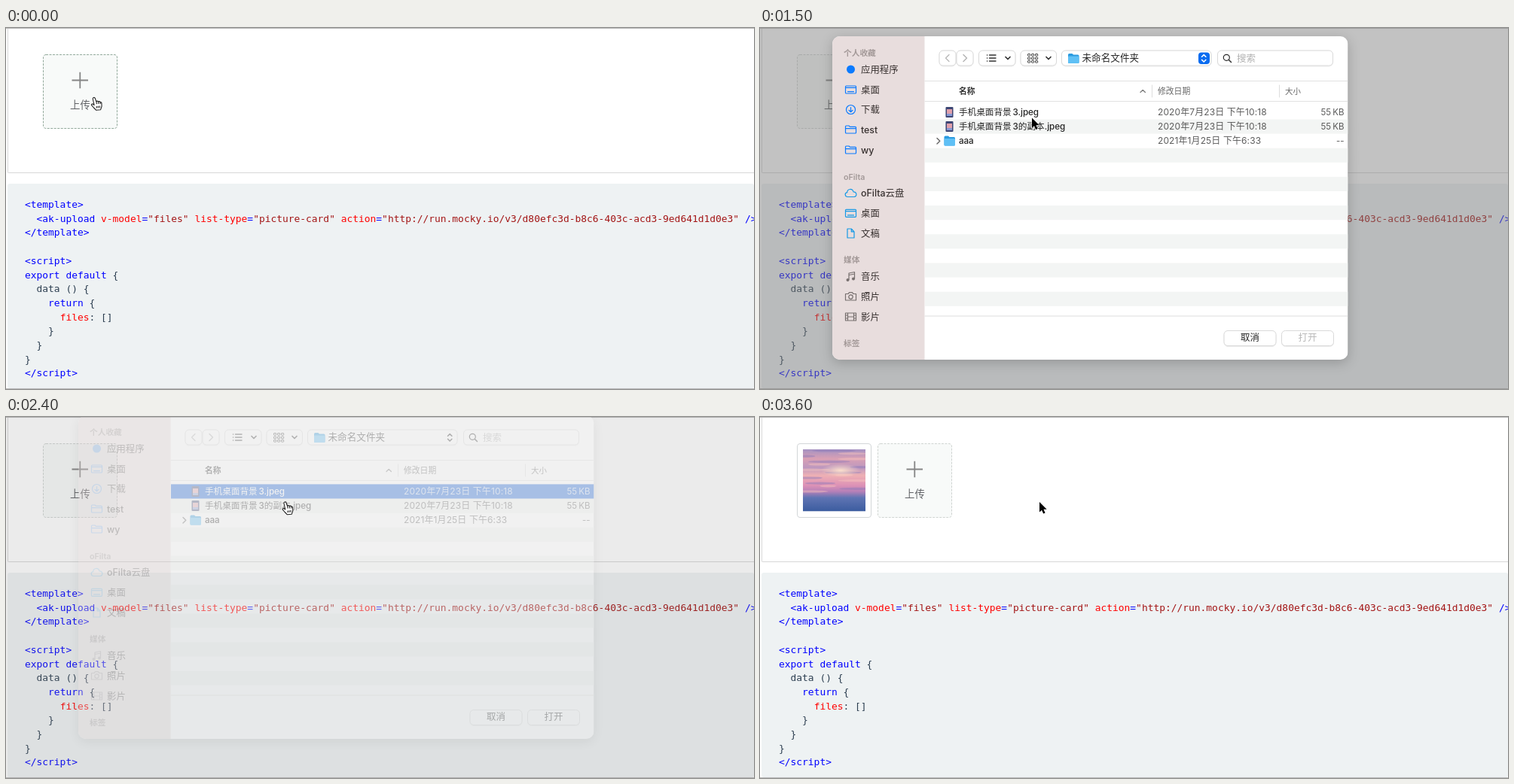
These frames come from a looping animation (993 by 480 pixels, 3.7 s). An HTML page:

```html
<!DOCTYPE html>
<html lang="zh">
<head>
<meta charset="utf-8">
<title>Upload demo</title>
<style>
html, body { margin: 0; width: 100%; height: 100%; overflow: hidden; background: #fff; }
.demo { position: absolute; left: 2px; top: 0; width: 991px; height: 193px; box-sizing: border-box; border: solid #d8d8d8; border-width: 0 0 1px 1px; border-radius: 0 0 0 2px; }
pre { position: absolute; left: 2px; top: 207px; width: 991px; height: 272px; margin: 0; padding: 19px 0 0 23px; box-sizing: border-box; overflow: hidden; background: #eef2f3; border-radius: 3px; color: #2c3e50; font: 12.91px/18.7px "DejaVu Sans Mono", monospace; }
pre b { color: #00f; font-weight: 400; }
pre i { color: #f00; font-style: normal; }
pre u { color: #a31515; text-decoration: none; }
svg { position: absolute; left: 0; top: 0; overflow: hidden; color: #262626; font-family: Inter, "Noto Sans CJK SC", "Noto Sans CJK", sans-serif; }
#sheet { filter: drop-shadow(0 4px 8px #0003); }
.line { fill: none; stroke: currentColor; stroke-width: 1.2; stroke-linecap: round; stroke-linejoin: round; }
</style>
</head>
<body>
<div class="demo"></div>
<pre><b>&lt;template&gt;</b>
  <b>&lt;ak-upload</b> <i>v-model</i><b>=</b><u>"files"</u> <i>list-type</i><b>=</b><u>"picture-card"</u> <i>action</i><b>=</b><u>"http://run.mocky.io/v3/d80efc3d-b8c6-403c-acd3-9ed641d1d0e3"</u> <b>/&gt;</b>
<b>&lt;/template&gt;</b>

<b>&lt;script&gt;</b>
<b>export</b> <b>default</b> {
  data () {
    <b>return</b> {
      <i>files</i>: []
    }
  }
}
<b>&lt;/script&gt;</b></pre>
<svg id="stage" width="993" height="480" viewBox="0 0 993 480"></svg>
<script>
const $ = id => document.getElementById(id);
const text = (x, y, s, size = 12, fill = '#262626', more = '') =>
  `<text x="${x}" y="${y}" font-size="${size}" fill="${fill}" ${more}>${s}</text>`;
const rect = (x, y, w, h, fill, r = 0, more = '') =>
  `<rect x="${x}" y="${y}" width="${w}" height="${h}" rx="${r}" fill="${fill}" ${more}/>`;
const path = (d, color, more = '') => `<path class="line" d="${d}" style="color:${color};${more}"/>`;
const medium = 'font-weight="500"', bold = 'font-weight="600"';

// Sidebar icons, drawn around 0,0
const icons = {
  dot: '<circle r="5.5" fill="currentColor"/>',
  desk: '<path class="line" d="M-6-5H6Q7-5 7-4V4Q7 5 6 5H-6Q-7 5-7 4V-4Q-7-5-6-5ZM-7-2.6H7M-4 2.6H4"/>',
  down: '<circle class="line" r="6"/><path class="line" d="M0-3V3M-2.5.8L0 3.2 2.5.8"/>',
  folder: '<path class="line" d="M-7-4Q-7-5-6-5H-2.5L-1-3.6H6Q7-3.6 7-2.6V4Q7 5 6 5H-6Q-7 5-7 4ZM-7-1.4H7"/>',
  cloud: '<path class="line" d="M-4 5C-8 5-8.5-.3-4.8-.9-4.5-6 2.3-6.5 3.5-1.7 8.5-1.8 8.5 5 4.5 5Z"/>',
  doc: '<path class="line" d="M-4.5-6H.8L4.5-2.2V6H-4.5ZM.8-6V-2.2H4.5"/>',
  music: '<path class="line" d="M-2.5 4V-4.5L5-6V2.5M-2.5-2L5-3.5"/><circle cx="-4" cy="4.5" r="2" fill="currentColor"/><circle cx="3.5" cy="3" r="2" fill="currentColor"/>',
  photo: '<path class="line" d="M-7-3.5H-3.5L-2-5.3H2L3.5-3.5H7V5H-7Z"/><circle class="line" cy=".6" r="2.7"/>',
  film: '<path class="line" d="M-7-5H7V5H-7ZM-4-5V5M4-5V5M-4 0H4M-7-2H-4M-7 2H-4M4-2H7M4 2H7"/>'
};
const blue = '#0a7aff', cyan = '#1599e6', gray = '#77706f';
const places = [
  [55, '应用程序', 'dot', blue], [82, '桌面', 'desk', blue], [108.5, '下载', 'down', blue],
  [135, 'test', 'folder', blue], [162, 'wy', 'folder', blue],
  [219.5, 'oFilta云盘', 'cloud', cyan], [246.3, '桌面', 'desk', cyan], [273, '文稿', 'doc', cyan],
  [330.5, '音乐', 'music', gray], [357, '照片', 'photo', gray], [384, '影片', 'film', gray]
];
const heads = [[32.5, '个人收藏'], [198, 'oFilta'], [308, '媒体'], [419, '标签']];
const sidebar = rect(96, 11, 122.5, 430, '#e8dddd')
  + heads.map(([y, s]) => text(111, y + 4, s, 10.7, '#a39998', bold)).join('')
  + '<g id="icons">' + places.map(([y, , k, c]) => `<g transform="translate(120.5 ${y})" style="color:${c}">${icons[k]}</g>`).join('') + '</g>'
  + '<g id="labels">' + places.map(([y, s]) => text(134, y + 4.5, s, 12.4, '#37302f', medium)).join('') + '</g>';

const button = (x, y, w, h = 20) => rect(x, y, w, h, '#fff', 5, 'stroke="#d9d9d9" filter="url(#soft)"');
const chevron = (x, y) => path(`M${x - 3} ${y - 1.5}l3 3 3-3`, '#333', 'stroke-width:1.7');
const folder = (x, y) => `<path d="M${x} ${y + 1.5}q0-1.5 1.5-1.5h4l1.5 1.5h6q1.5 0 1.5 1.5v8.5q0 1.5-1.5 1.5h-11.5q-1.5 0-1.5-1.5z" fill="#2b9be0"/>`
  + rect(x, y + 3.5, 14.5, 9.5, '#5fc0f5', 1.3);
const dots = [0, 1, 2].map(r => [0, 1, 2].map(c =>
  rect(355.5 + c * 5, 34.5 + r * 4.5, 3.2, 2.6, 'none', .5, 'stroke="#444"')).join('')).join('');
const lines = [36, 40, 44].map(y => path(`M301.5 ${y}h.2M304.5 ${y}h8.5`, '#333', 'stroke-width:1.4')).join('');
const toolbar = button(238, 30, 22) + button(261, 30, 22) + button(290.5, 30, 48.5) + button(346, 30, 47.5)
  + button(400.5, 30, 198.5) + button(607.5, 30, 153)
  + '<path id="back" class="line" d="M251 35.5l-4.5 4.5 4.5 4.5"/>'
  + path('M270 35.5l4.5 4.5-4.5 4.5', '#b5b5b5', 'stroke-width:1.5')
  + lines + chevron(329, 40) + dots + chevron(383, 40) + folder(409, 34)
  + text(427.5, 44.3, '未命名文件夹', 12.6, '#262626', medium)
  + rect(582, 32.5, 15, 15.5, '#0a6cf0', 4, 'id="step"')
  + '<path id="arrows" class="line" d="M586.5 38.3l2.7-2.7 2.7 2.7M586.5 42.3l2.7 2.7 2.7-2.7" style="stroke-width:1.5"/>'
  + '<circle class="line" cx="619.3" cy="39.3" r="4"/>' + path('M622.5 42.5l3 3', '#333', 'stroke-width:1.5')
  + text(633, 44.7, '搜索', 12.5, '#b0b0b0');

const listTop = 102.4, rowH = 19.1;
const stripes = [1, 3, 5, 7, 9, 11, 13].map(i => rect(219, listTop + i * rowH, 561.5, rowH, '#f3f5f4')).join('');
const picture = y => rect(246.5, y - 7, 10, 14, '#3d4674', 1) + rect(248, y - 4, 7, 6, '#e0a0ac') + rect(248, y + 2, 7, 3, '#8799d4');
const row = (y, name, date, size, id) =>
  `<g id="${id}">` + text(264, y + 4.2, name, 11.7, 'currentColor', medium + ' letter-spacing="-.08"')
  + text(528, y + 4.2, date, 12, 'currentColor', 'letter-spacing=".1" opacity=".75"')
  + text(775.5, y + 4.2, size, 11.5, 'currentColor', 'text-anchor="end" opacity=".75"') + '</g>';
const list = path('M219 70.5H780M219 97.5H780', '#e1e1e1', 'stroke-width:1') + path('M520.5 76V92M689.5 76V92', '#ddd', 'stroke-width:1')
  + text(264, 87.5, '名称', 10.8, '#333', bold) + path('M505 85.5l3.2-3.2 3.2 3.2', '#777')
  + text(528, 87.5, '修改日期', 10.8, '#666') + text(697, 87.5, '大小', 10.5, '#666')
  + stripes + rect(219, listTop, 561.5, rowH, '#0c5cda', 0, 'id="pick"')
  + picture(112) + picture(131) + folder(244.5, 143.5) + path('M235 146.5l3.8 3.7-3.8 3.7', '#666', 'stroke-width:1.4')
  + row(112, '手机桌面背景\u20093.jpeg', '2020年7月23日 下午10:18', '55\u2009KB', 'first')
  + row(131, '手机桌面背景\u20093的副本.jpeg', '2020年7月23日 下午10:18', '55\u2009KB', 'second')
  + row(150, 'aaa', '2021年1月25日 下午6:33', '--', 'third');
const footer = path('M219 383H780', '#ddd', 'stroke-width:1') + button(616, 402.5, 69) + button(692.5, 402.5, 69)
  + text(650.5, 416.3, '取消', 12.5, '#262626', 'text-anchor="middle" ' + medium)
  + text(727, 416.3, '打开', 12.5, 'currentColor', 'id="open" text-anchor="middle" ' + medium);

const card = `<g id="card">${rect(49.5, 35.5, 98, 98, '#f8faf9', 3.5, 'id="edge" stroke-dasharray="3 1.5"')}
  <path d="M87.5 69.5h21.5M98.3 58.7v21.5" stroke="#858585" stroke-width="1.8"/>
  ${text(98.5, 107.3, '上传', 13.4, '#606266', 'text-anchor="middle"')}</g>`;

// Sunset sky: gradient, thin cloud bands and a glow
const bands = Array.from({ length: 16 }, (_, i) =>
  `<ellipse cx="${98 + 36 * Math.sin(i * 2.4)}" cy="${45 + i * 3.6}" rx="${20 + 9 * Math.cos(i * 1.7)}" ry="1.6" fill="${i % 2 ? '#f6c3bd' : '#8a78b8'}" opacity=".45"/>`).join('');
const thumb = `<g id="thumb">${rect(49.5, 35.5, 98, 98, '#fff', 3.5, 'stroke="#d3d6d8"')}
  <g clip-path="url(#photo)">${rect(57, 43, 83, 82.5, 'url(#sky)')}${bands}<ellipse cx="107" cy="71" rx="26" ry="9" fill="url(#glow)"/></g></g>`;

const stops = list => list.map(([o, c, a = 1]) => `<stop offset="${o}" stop-color="${c}" stop-opacity="${a}"/>`).join('');
$('stage').innerHTML = `<defs>
  <linearGradient id="sky" x2="0" y2="1">${stops([[0, '#a592c2'], [.15, '#d9a0b4'], [.3, '#bd98bf'], [.42, '#eeb0b4'], [.58, '#dd92b6'], [.68, '#b580b8'], [.78, '#5f74b3'], [1, '#3b5c9f']])}</linearGradient>
  <radialGradient id="glow">${stops([[0, '#ffe6cf', .9], [1, '#ffe1c8', 0]])}</radialGradient>
  <filter id="soft" x="-5%" y="-20%" width="110%" height="150%"><feDropShadow dx="0" dy=".5" stdDeviation=".5" flood-opacity=".15"/></filter>
  <clipPath id="photo">${rect(57, 43, 83, 82.5, '#000')}</clipPath>
  <clipPath id="round">${rect(96, 11, 684.5, 430, '#000', 10)}</clipPath></defs>
  ${thumb}${card}
  <path d="M0 .5H993M0 479.5H993" stroke="#bbb"/>
  ${rect(0, 0, 993, 480, '#787878', 0, 'id="dim"')}
  <g id="sheet"><g clip-path="url(#round)">${rect(96, 11, 684.5, 430, '#fff')}${sidebar}${toolbar}${list}${footer}</g></g>
  <g id="cursor" stroke-linejoin="round">
    <path id="arrow" d="M0 0V13.5L3 10.7 5.2 15.6 7.6 14.5 5.5 9.8H9.7Z" fill="#000" stroke="#fff" stroke-width="1.2" paint-order="stroke"/>
    <path id="hand" d="M-2 2C-2.6-.2.3-1 1 1L2.6 5.6C2.8 4.3 5 4.3 5.2 5.7 5.8 4.7 7.5 5 7.7 6.3 8.5 5.7 9.5 6.2 9.6 7.3L9.8 11.5 8.3 16.2 2.2 16.7-.8 13.5-3.7 10.2C-4.5 8.8-2.7 7.8-1.5 9L-.2 10ZM2.6 5.6L3.3 8.5M5.2 5.7L5.7 8.5M7.7 6.3L8 8.5M3 11.5V14M5 11.3V13.8M7 11.1V13.6" fill="#fff" stroke="#222" stroke-width="1.1"/>
  </g>`;

// Value at t on a list of [time, value] points
function at(t, keys, ease = k => k) {
  const i = keys.findIndex(k => k[0] > t);
  if (i < 0) return keys[keys.length - 1][1];
  if (!i) return keys[0][1];
  const [t0, a] = keys[i - 1], [t1, b] = keys[i];
  return a + (b - a) * ease((t - t0) / (t1 - t0));
}
const smooth = k => k * k * (3 - 2 * k);
const show = (id, on) => $(id).style.display = on ? '' : 'none';

function draw(now) {
  const t = Math.floor(now % 3700 / 100) * 100; // ten steps a second
  const open = t >= 500 && t < 2600, picked = t >= 1900, closing = t >= 2300, done = t >= 3200;
  const hand = t < 500 || (closing && open);

  show('sheet', open);
  show('dim', open);
  $('sheet').setAttribute('transform', `translate(0 ${at(t, [[500, -24], [600, -10.6], [700, 0], [2200, 0], [2300, -2.8], [2400, -13]])})`);
  $('sheet').style.opacity = at(t, [[500, .6], [600, 1], [2200, 1], [2300, .84], [2400, .3]]);
  $('dim').style.opacity = at(t, [[500, .12], [600, .27], [700, .45], [2200, .45], [2300, .35], [2400, .15]]);

  show('pick', picked);
  $('first').style.color = picked ? '#fff' : '';
  $('open').style.color = picked ? '' : '#b8b8b8';
  $('back').style.color = t < 800 ? '' : '#b5b5b5';
  show('step', !closing);
  $('arrows').style.color = closing ? '' : '#fff';
  $('icons').style.opacity = closing ? .45 : 1;
  $('labels').style.opacity = closing ? .8 : 1;

  $('edge').setAttribute('stroke', t < 1300 ? '#93aa9c' : '#d0d5d2');
  $('card').setAttribute('transform', `translate(${done ? 107 : 0} 0)`);
  show('thumb', done);

  const x = at(t, [[800, 117.3], [1500, 361], [1800, 371]], smooth);
  const y = at(t, [[800, 92.5], [1500, 119.5], [1800, 113]], smooth);
  $('cursor').setAttribute('transform', `translate(${x} ${y})`);
  show('hand', hand);
  show('arrow', !hand);
}
const start = performance.now();
(function tick() {
  draw(performance.now() - start);
  requestAnimationFrame(tick);
})();
</script>
</body>
</html>
```
